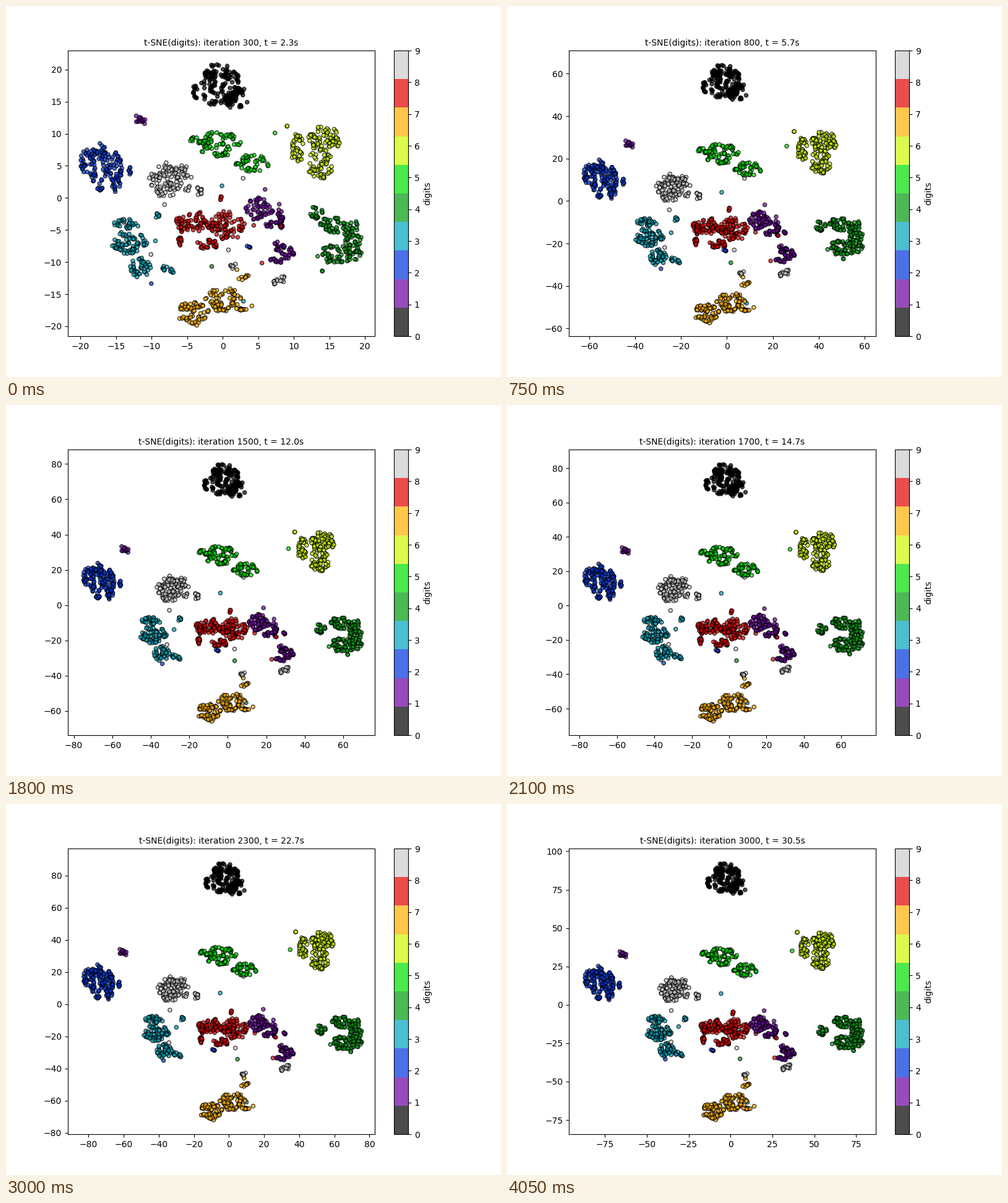
These frames come from a looping animation (800x600 px, 4.2 s). A matplotlib script:

```python
import numpy as np
import matplotlib.pyplot as plt
from matplotlib.animation import FuncAnimation

STEPS = 28
SHRINK = .7  # how far clusters tighten on the stage over the run
rng = np.random.default_rng(7)

# iteration, seconds, x limits, y limits
KEYS = np.array([(300, 2.3, -21.77, 21.37, -21.55, 22.96),
                 (800, 5.7, -68.9, 64.86, -63.65, 70.9),
                 (1500, 12.0, -83.1, 76.4, -73.7, 88.2),
                 (2000, 18.8, -89.2, 81.1, -77.7, 94.1),
                 (2600, 26.6, -94.05, 84.7, -83.5, 99.3),
                 (3000, 30.5, -96.5, 86.7, -84.25, 101.8)])

starts, ends, labels = [], [], []


def clock(it):
    """The embedding grows almost linearly in this variable."""
    return np.log(it - 250)


def fill(x, y, rx, ry, tilt=0):
    """Random points in an ellipse, some of them crowding next to others."""
    n = round(.08 * rx * ry + .6 * (rx + ry))
    r, a = rng.random(n) ** .45, rng.random(n) * 2 * np.pi
    p = np.stack([r * np.cos(a), r * np.sin(a)], axis=1)
    m = int(np.ceil(.65 * n))
    p[m:] = p[rng.integers(m, size=n - m)] + rng.normal(0, .1, (n - m, 2))
    p *= rx, ry
    p[:, 1] += tilt * p[:, 0]
    return p + (x, y)


def cluster(digit, start, shift, *blobs):
    """Blobs are (x, y, rx, ry[, tilt]) around start, in stage pixels."""
    offsets = np.vstack([fill(*b) for b in blobs or [(0, 0, 1, 1)]])
    starts.append(offsets + start)
    ends.append(offsets * SHRINK + np.add(start, shift))
    labels.extend([digit] * len(offsets))


def on_axes(pixels):
    """Stage pixels to axes fractions."""
    x, y = np.vstack(pixels).T
    return np.stack([(x - 100) / 496, (534 - y) / 462], axis=1)


# Main clusters
cluster(0, (350, 130), (7, -9), (-2, -1, 34, 35), (24, 20, 20, 14), (-44, 10, 4, 14))
cluster(1, (415, 332), (-2, 27), (-6, -4, 22, 18), (29, 6, 5, 22), (14, 20, 10, 6), (4, -36, 1, 1))
cluster(1, (446, 398), (5, 4), (-5, -9, 10, 10), (10, 2, 10, 10), (-8, 13, 12, 4), (-1, -41, 3, 5))
cluster(2, (158, 262), (-6, 28), (-12, -10, 26, 32), (20, 8, 10, 34), (-8, 34, 6, 4), (42, 4, 2, 8))
cluster(3, (200, 392), (46, -16), (-6, -40, 22, 8), (-2, -10, 28, 20), (16, 32, 18, 16))
cluster(4, (540, 382), (11, -10), (-12, -28, 20, 14), (20, -8, 14, 30), (-2, 20, 36, 14))
cluster(5, (360, 238), (-2, 19), (-53, -22, 10, 6), (-16, -14, 34, 20), (40, 16, 26, 14))
cluster(6, (500, 235), (1, 1), (14, -20, 26, 22), (8, 20, 22, 24), (-30, -6, 12, 22), (-46, -40, 1, 2))
cluster(7, (338, 484), (20, 4), (-34, 10, 24, 20), (14, -10, 30, 18), (44, 5, 12, 4), (60, 1, 1, 1))
cluster(8, (325, 358), (23, 8), (-22, -8, 30, 16), (32, -2, 27, 24), (-44, 14, 5, 16), (0, 28, 18, 8))
cluster(9, (268, 281), (4, 19), (0, 0, 35, 29))

# Small groups
cluster(1, (217, 184), (-30, 59), (0, 0, 12, 6, .3))
cluster(2, (394, 389), (-61, 9), (0, 0, 6, 1.5))
cluster(3, (244, 338), (43, 9), (0, 2, 5, 4))
cluster(3, (261, 426), (16, -22), (0, 0, 11, 4, .3))
cluster(4, (502, 333), (8, 33), (0, 0, 11, 11))
cluster(4, (511, 429), (49, -30), (0, 0, 1, 2))
cluster(7, (385, 439), (2, 16), (0, 0, 10, 3, -.4))
cluster(8, (347, 311), (18, 27), (0, 0, 2, 4))
cluster(9, (312, 298), (-5, 12), (0, 0, 5, 9))
cluster(9, (368, 420), (18, 18), (0, 0, 5, 4, -.4))
cluster(9, (442, 444), (10, -18), (0, 0, 11, 6, -.3))

# Strays
cluster(2, (235, 448), (21, -36))
cluster(3, (349, 290), (-3, 16))
cluster(3, (384, 477), (5, 5))
cluster(3, (241, 380), (36, -20))
cluster(4, (333, 421), (44, -9))
cluster(5, (435, 206), (26, 32))
cluster(7, (374, 427), (12, 18))
cluster(8, (413, 415), (19, -5))
cluster(8, (400, 354), (2, 17))
cluster(8, (445, 357), (-9, 22))
cluster(9, (383, 279), (1, 0))
cluster(9, (257, 321), (9, 13))
cluster(9, (234, 402), (31, -17))
cluster(9, (359, 395), (12, 0))

order = rng.permutation(len(labels))
first, last = on_axes(starts)[order], on_axes(ends)[order]

fig, ax = plt.subplots(figsize=(8, 6), dpi=100)
points = ax.scatter(*first.T, c=np.array(labels)[order], s=20, linewidths=1,
                    edgecolors="k", alpha=.7, vmin=0, vmax=9,
                    cmap=plt.get_cmap("nipy_spectral", 10), transform=ax.transAxes)
fig.colorbar(points, ax=ax, label="digits", ticks=range(10))
title = ax.set_title("", fontsize=10)


def draw(i):
    it = 300 + 100 * i
    u, marks = clock(it), clock(KEYS[:, 0])
    w = ((u - marks[0]) / (marks[-1] - marks[0])) ** .8
    points.set_offsets(first + (last - first) * w)
    x0, x1, y0, y1 = [np.interp(u, marks, col) for col in KEYS[:, 2:].T]
    ax.set_xlim(x0, x1)
    ax.set_ylim(y0, y1)
    seconds = np.interp(it, KEYS[:, 0], KEYS[:, 1])
    title.set_text(f"t-SNE(digits): iteration {it}, t = {seconds:.1f}s")
    return points, title


anim = FuncAnimation(fig, draw, frames=STEPS, interval=150, repeat=True,
                     repeat_delay=0, blit=False)
plt.show()
```
